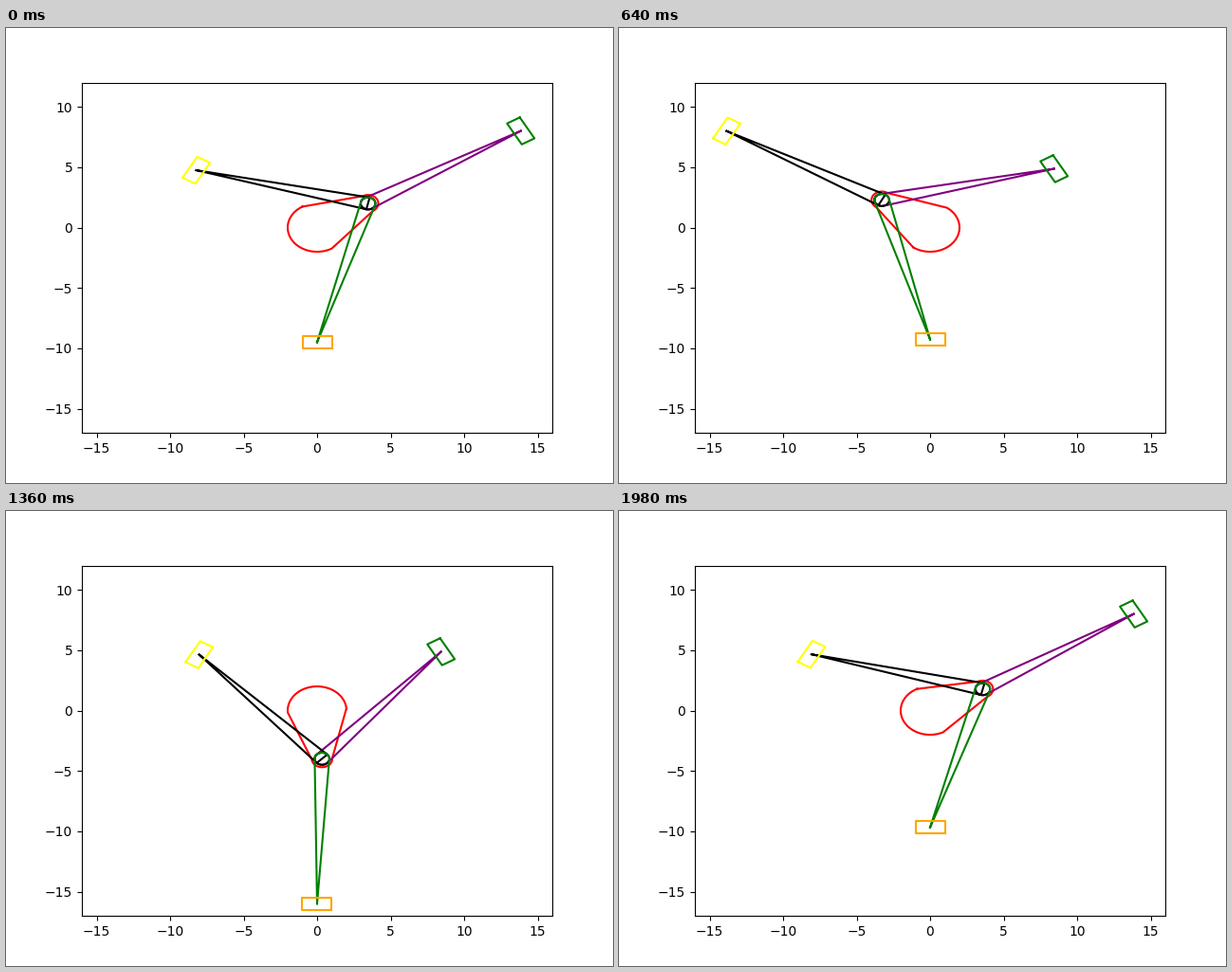
A matplotlib script that plays this animation: 640x480 px, repeating every 2 s.

```python
import numpy as np
import matplotlib.pyplot as plt
from matplotlib.animation import FuncAnimation

FRAMES = 100
CRANK, ROD = 4, 12
HUB_R, WEB_R, PIN_R = 2, 0.7, 0.5
START = np.radians(30)

# (cylinder angle in degrees, rod colour, piston colour, crank-end arc in half turns)
CYLINDERS = [
    (30, "purple", "green", 1),
    (150, "black", "yellow", 2),
    (270, "green", "orange", 1),
]


def polar(r, a):
    return np.array([r * np.cos(a), r * np.sin(a)])


def arc(center, r, start, stop, n=60):
    return center[:, None] + polar(r, np.linspace(start, stop, n))


def crank_outline(a, pin):
    quarter = np.pi / 2
    hub = arc(np.zeros(2), HUB_R, a + quarter, a + 3 * quarter)
    web = arc(pin, WEB_R, a - quarter, a + quarter)
    return np.column_stack([hub, web, hub[:, 0]])


def piston_center(pin, axis):
    u = polar(1, axis)
    along = pin @ u
    across = pin[0] * u[1] - pin[1] * u[0]
    return u * (along + np.sqrt(ROD**2 - across**2))


def rod_outline(pin, end, turns):
    """Two lines from the wrist pin, tangent to an arc around the crank pin."""
    dx, dy = end - pin
    a = np.arctan2(dy, dx) + np.pi / 2
    big_end = arc(pin, PIN_R, a, a + turns * np.pi)
    far_side = pin + polar(PIN_R, a + np.pi)
    return np.column_stack([end, big_end, far_side, end])


def piston_outline(center, axis):
    u, v = polar(0.5, axis), polar(1, axis + np.pi / 2)
    corners = [u + v, u - v, -u - v, v - u, u + v]
    return np.array([center + c for c in corners]).T


fig, ax = plt.subplots(figsize=(6.4, 4.8), dpi=100)
ax.set_xlim(-16, 16)
ax.set_ylim(-17, 12)

crank, = ax.plot([], [], color="red")
rods = [ax.plot([], [], color=c[1])[0] for c in CYLINDERS]
pistons = [ax.plot([], [], color=c[2])[0] for c in CYLINDERS]


def update(i):
    a = START + 2 * np.pi * i / FRAMES
    pin = polar(CRANK, a)
    crank.set_data(*crank_outline(a, pin))
    for (deg, _, _, turns), rod, piston in zip(CYLINDERS, rods, pistons):
        axis = np.radians(deg)
        end = piston_center(pin, axis)
        rod.set_data(*rod_outline(pin, end, turns))
        piston.set_data(*piston_outline(end, axis))
    return [crank, *rods, *pistons]


anim = FuncAnimation(fig, update, frames=FRAMES, interval=20, repeat=True)
plt.show()
```
